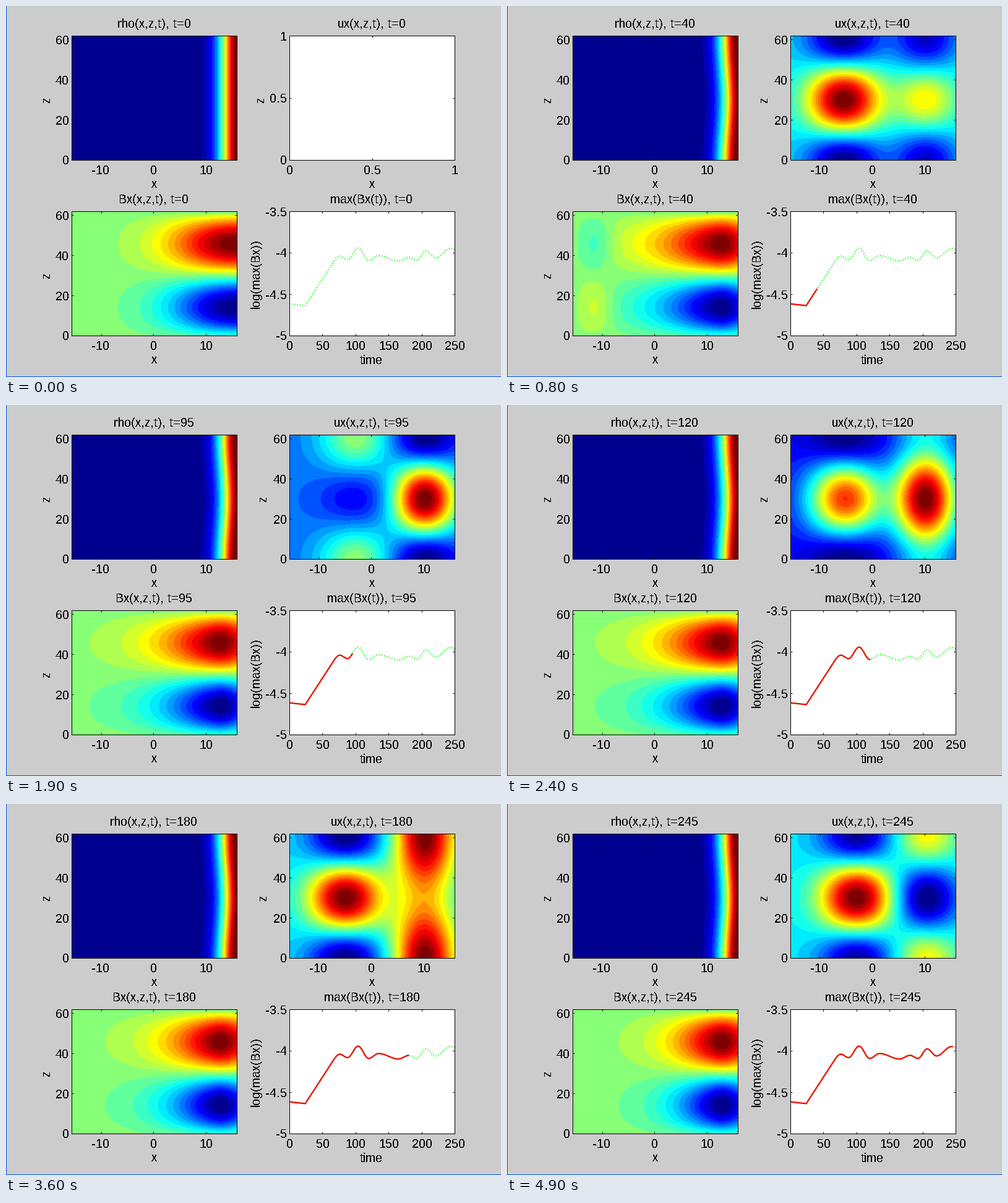
Recreate the animation shown at these times as a matplotlib script. Size 800x600 px, loop 5000 ms.

```python
import matplotlib.pyplot as plt
import numpy as np
from matplotlib.animation import FuncAnimation
from matplotlib.lines import Line2D

PX = 0.72                    # one pixel in points
plt.rcParams.update({
    "font.family": "Liberation Sans", "font.size": 20 * PX,
    "text.antialiased": False, "text.hinting": "default",
    "text.hinting_factor": 1, "axes.linewidth": PX,
})
W, H = 800, 600
AW, AH = 267, 201            # panel size in pixels
LEFT, RIGHT, TOP, LOW = 106, 458, 48, 332
XLIM, ZLIM = (-15.75, 16), (0, 62)
FRAMES, DT = 50, 5
BANDS = 27

fig = plt.figure(figsize=(8, 6), dpi=100, facecolor="#cccccc")
for xs, ys in (([0, 0], [0, 1]), ([0, 1], [1 / H, 1 / H])):
    fig.add_artist(Line2D(xs, ys, color="#0054e3", lw=PX))


def label(x, y, s="", **kw):
    kw = {"ha": "center", "va": "baseline", **kw}
    return fig.text(x / W, 1 - y / H, s, **kw)


def side_label(x, y, s):
    return label(x, y, s, rotation=90, rotation_mode="anchor")


def panel(left, top):
    ax = fig.add_axes([left / W, 1 - (top + AH) / H, AW / W, AH / H])
    ax.tick_params(direction="in", length=3 * PX, width=PX, top=True, right=True,
                   labelbottom=False, labelleft=False)
    return ax


def set_scale(ax, xlim, ylim, xticks, yticks):
    ax.set(xlim=xlim, ylim=ylim, xticks=xticks, yticks=yticks)


def tick_labels(left, top, xlim, ylim, xticks, yticks):
    texts = []
    for v in xticks:
        x = left + 0.5 + (v - xlim[0]) / (xlim[1] - xlim[0]) * AW
        texts.append(label(x - 2 * (v < 0), top + 224, f"{v:g}"))
    for v in yticks:
        y = top + AH - (v - ylim[0]) / (ylim[1] - ylim[0]) * AH
        texts.append(label(left - 4, y + 7.5, f"{v:g}", ha="right"))
    return texts


FIELD = (XLIM, ZLIM, (-10, 0, 10), (0, 20, 40, 60))
UNIT = ((0, 1), (0, 1), (0, .5, 1), (0, .5, 1))
LOG = ((0, 250), (-5, -3.5), range(0, 251, 50), (-5, -4.5, -4, -3.5))

rho_ax, bx_ax = panel(LEFT, TOP), panel(LEFT, LOW)
ux_ax, log_ax = panel(RIGHT, TOP), panel(RIGHT, LOW)
for ax, left, top, scale in ((rho_ax, LEFT, TOP, FIELD), (bx_ax, LEFT, LOW, FIELD),
                             (log_ax, RIGHT, LOW, LOG)):
    set_scale(ax, *scale)
    tick_labels(left, top, *scale)
unit_texts = tick_labels(RIGHT, TOP, *UNIT)
field_texts = tick_labels(RIGHT, TOP, *FIELD)

for x, y, s in ((239, 294, "x"), (591, 294, "x"), (239, 578, "x"), (590, 579, "time")):
    label(x, y, s)
side_label(71, 151, "z")
side_label(71, 435, "z")
side_label(410, 433, "log(max(Bx))")
ux_side = side_label(417, 151, "z")
titles = {name: label(x, y) for name, x, y in (
    ("rho(x,z,t)", 239, 35), ("ux(x,z,t)", 591, 35),
    ("Bx(x,z,t)", 239, 319), ("max(Bx(t))", 591, 319))}

X, Z = np.meshgrid(np.linspace(*XLIM, AW), np.linspace(*ZLIM, AH))
WAVE = np.cos(2 * np.pi * (Z - 30) / 62)


def jet(field):
    """Banded colours over the field's own range."""
    u = (field - field.min()) / np.ptp(field)
    u = np.minimum(np.floor(u * BANDS), BANDS - 1) / (BANDS - 1)
    u = (1 + 63 * u) / 64
    return np.stack([np.clip(1.5 - np.abs(4 * u - c), 0, 1) for c in (3, 2, 1)], -1)


def bump(center, width):
    return np.exp(-((X - center) / width) ** 2)


def rho(t):
    bend = 0.27 * min(1, t / 40) * WAVE
    return np.exp(-((16 - X + bend).clip(0) / 3.2) ** 1.7)


def bx(t):
    settle = min(1, t / 40)
    d = X - (16 - 3.2 * settle)
    tail = np.exp(-(np.abs(d) / (12.6 - 0.016 * t)) ** (2 - 0.55 * settle))
    shape = np.where(d < 0, tail, np.exp(-(d / 6.5) ** 2))
    echo = 0.18 * np.exp(-((t - 40) / 20) ** 2) * bump(-11.5, 3.5)
    return (shape - echo) * np.sin(2 * np.pi * (Z - 30) / 63.5)


def ux(t):
    """Two pulsing lobes, each with an even part and a part that waves along z."""
    def pulse(*values):
        return np.interp(t, (40, 95, 145, 180, 215, 245), values)

    left = bump(pulse(-5.5, -3, -7.5, -5, -7, -3), 7)
    right = bump(10.3, 6)
    return (left * (pulse(.14, .06, .16, .14, -.18, .15)
                    + pulse(.45, -.15, .47, .46, .03, .46) * WAVE)
            + right * (pulse(0, .2, .24, .46, .14, -.05)
                       + pulse(.25, .38, -.14, -.14, -.47, -.3) * WAVE))


# Turning points of the saturated phase, joined by cosine easing.
TURNS = np.array([(76, -4.041), (88, -4.083), (104, -3.945), (120, -4.093),
                  (135, -4.034), (165, -4.1), (181, -4.056), (193, -4.093),
                  (207, -3.978), (221, -4.063), (244, -3.95), (262, -4.0)])


def growth(t):
    start = -4.617 - 0.0009 * t
    rise = -4.638 + 0.0123 * (t - 24)
    top = TURNS[0, 1]
    early = np.maximum(start, top - 0.02 * np.logaddexp(0, (top - rise) / 0.02))
    pos = np.interp(t, TURNS[:, 0], np.arange(len(TURNS)))
    i = np.floor(pos)
    eased = i + (1 - np.cos(np.pi * (pos - i))) / 2
    late = np.interp(eased, np.arange(len(TURNS)), TURNS[:, 1])
    return np.where(t < TURNS[0, 0], early, late)


def image(ax):
    return ax.imshow(np.ones((AH, AW, 3)), extent=(*XLIM, *ZLIM), origin="lower",
                     aspect="auto", interpolation="nearest")


images = [(image(rho_ax), rho), (image(ux_ax), ux), (image(bx_ax), bx)]
all_t = np.linspace(0, 250, 501)
log_ax.plot(all_t, growth(all_t), color="#00ff00", lw=3 * PX,
            ls=(0, (0.33, 1.1)), dash_capstyle="butt")
trace, = log_ax.plot([], [], color="#ff0000", lw=2.2 * PX)


def draw(frame):
    t = frame * DT
    started = t > 0
    for name, text in titles.items():
        text.set_text(f"{name}, t={t}")
    for img, field in images:
        img.set_data(jet(field(t)))
    images[1][0].set_visible(started)
    for text in field_texts:
        text.set_visible(started)
    for text in unit_texts:
        text.set_visible(not started)
    set_scale(ux_ax, *(FIELD if started else UNIT))
    ux_side.set_x((421 if started else 417) / W)
    past = np.linspace(0, t, 2 * t + 1)
    trace.set_data(past, growth(past))
    trace.set_visible(started)
    return []


anim = FuncAnimation(fig, draw, frames=FRAMES, interval=100, repeat=True,
                     repeat_delay=0, blit=False)
plt.show()
```
